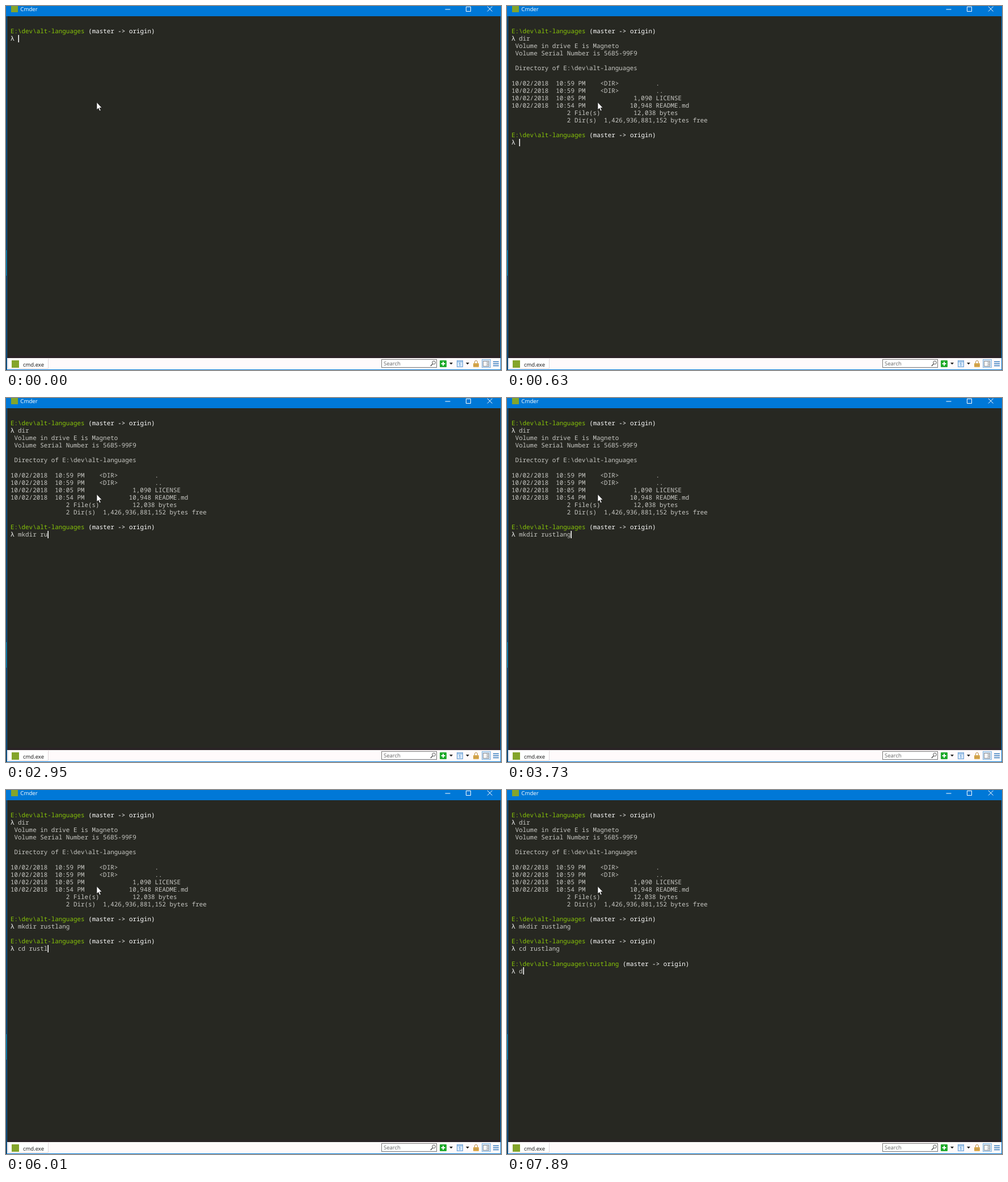
Recreate the animation shown at these times as an HTML page. Size 873 by 641 pixels, loop 8000 ms.

```html
<!DOCTYPE html>
<html lang="en">
<head>
<meta charset="utf-8">
<title>Terminal session</title>
<style>
  html, body { margin: 0; width: 100%; height: 100%; overflow: hidden; background: #272822; }
  svg { display: block; width: 873px; height: 641px; }
  text { text-rendering: geometricPrecision; white-space: pre; }
  #terminal { font: 10.885px "Noto Sans Mono", "DejaVu Sans Mono", monospace; }
  #terminal [fill="#fff"] { font-weight: 500; }
  .ui { font: 9.5px "Open Sans", "Noto Sans", sans-serif; }
  .line { fill: none; stroke-width: 1; }
</style>
</head>
<body>
<svg viewBox="0 0 873 641">
  <rect width="873" height="641" fill="#272822"/>
  <rect y="18" width="1" height="623" fill="#0b2c42"/>
  <rect y="430" width="1" height="45" fill="#087f92"/>
  <rect x="1" y="18" width="1" height="623" fill="#0a68b4"/>
  <rect x="872" y="18" width="1" height="623" fill="#0078d7"/>

  <!-- Title bar -->
  <rect width="873" height="18" fill="#0078d7"/>
  <rect x="9" width="12" height="11" fill="#84a52b"/>
  <text class="ui" x="25.3" y="9" fill="#fff" style="font-size:9.7px">Cmder</text>
  <path class="line" stroke="#fff" d="M774.5 6h9M811.5 1.5h8v8h-8zM849 1l8.5 8.5M857.5 1L849 9.5"/>

  <!-- Status bar -->
  <rect x="2" y="616" width="870" height="4" fill="#2a2326"/>
  <rect x="2" y="620" width="870" height="20" fill="#fffafb"/>
  <rect x="1" y="640" width="872" height="1" fill="#0078d7"/>
  <rect x="4" y="621" width="70" height="17" fill="#fff"/>
  <path class="line" stroke="#ddd8da" d="M3.5 621v17.5h71v-17.500"/>
  <rect x="10" y="624" width="13" height="13" fill="#84a52b"/>
  <text class="ui" x="30" y="634.5" fill="#111">cmd.exe</text>

  <rect x="662.5" y="622.5" width="97" height="14" fill="#fff" stroke="#777"/>
  <text class="ui" x="666" y="633" fill="#666" font-style="italic">Search</text>
  <g class="line" stroke="#555"><circle cx="754.5" cy="628" r="2.8"/><path stroke-width="1.6" d="M752.5 630.3l-3.7 3.7"/></g>

  <rect x="765" y="624" width="12" height="12" rx="1" fill="#1faa2b"/>
  <path stroke="#fff" stroke-width="2" d="M767.5 630h7M771 626.5v7"/>
  <path fill="#222" d="M782 628h6l-3 3.5zM811 628h6l-3 3.5z"/>

  <rect x="795.5" y="624.5" width="10" height="11" fill="#d5e6f8" stroke="#6a9fd4"/>
  <path class="line" stroke="#6a9fd4" d="M796 626.5h9M799 629.5l1.5-1v5.5"/>

  <path class="line" stroke="#b68c45" stroke-width="1.5" d="M826.5 630v-3q0-2.5 2.5-2.5t2.5 2.5v3"/>
  <rect x="824" y="629" width="10" height="7" rx="1" fill="#d9a94e"/>
  <path class="line" stroke="#b68c45" d="M824.5 632.5h9"/>

  <rect x="839.5" y="622.5" width="15" height="14" fill="#d3e6f7" stroke="#88b7df"/>
  <rect x="841.5" y="625.5" width="10" height="9" fill="#f4f4f4" stroke="#8a8f96"/>
  <path class="line" stroke="#9ca2aa" d="M848.5 626v8M849 628.5h2M849 631.5h2"/>

  <path stroke="#2f78bd" stroke-width="1.5" d="M859 626.5h10M859 630h10M859 633.5h10"/>

  <g id="terminal"></g>
  <rect id="caret" width="1.5" height="13" fill="#fff"/>
  <path fill="#fff" stroke="#111" stroke-width=".7" d="M160 169.5v13.3l3-2.7 2 4.7 2.2-.9-2-4.6h4z"/>
</svg>
<script>
const LOOP = 8000, LEFT = 8, TOP = 37.93, COL = 6.531, ROW = 13.07;
const GREEN = '#87c408', WHITE = '#fff', GRAY = '#c8c8c4';
const HOME = 'E:\\dev\\alt-languages';
const terminal = document.getElementById('terminal');
const caret = document.getElementById('caret');

const listing = ` Volume in drive E is Magneto
 Volume Serial Number is 56B5-99F9

 Directory of E:\\dev\\alt-languages

10/02/2018  10:59 PM    <DIR>          .
10/02/2018  10:59 PM    <DIR>          ..
10/02/2018  10:05 PM             1,090 LICENSE
10/02/2018  10:54 PM            10,948 README.md
               2 File(s)         12,038 bytes
               2 Dir(s)  1,426,936,881,152 bytes free`.split('\n');

// Evenly spaced key presses from first to last, in ms
const keys = (first, last, count) =>
  Array.from({ length: count }, (_, i) => first + (last - first) * i / (count - 1));

const prompts = [
  { start: 0, row: 0, path: HOME, command: 'dir', keys: [230, 400, 400] },
  { start: 630, row: 14, path: HOME, command: 'mkdir rustlang', output: listing, caretTime: 610,
    keys: [...keys(1720, 2020, 3), ...keys(2190, 2650, 4), ...keys(2800, 3730, 7)] },
  { start: 3960, row: 17, path: HOME, command: 'cd rustlang',
    keys: [...keys(4890, 5210, 3), ...keys(5380, 5690, 4), ...keys(6010, 6390, 4)] },
  { start: 7170, row: 20, path: HOME + '\\rustlang', command: 'd', keys: [7890] }
];

function svg(name, parent, attributes = {}) {
  const node = document.createElementNS('http://www.w3.org/2000/svg', name);
  for (const key in attributes) node.setAttribute(key, attributes[key]);
  return parent.appendChild(node);
}

function write(parent, row, col, string, fill) {
  const node = svg('text', parent, { x: LEFT + col * COL, y: TOP + row * ROW + 10.2, fill });
  node.textContent = string;
  return node;
}

for (const p of prompts) {
  p.group = svg('g', terminal);
  (p.output || []).forEach((line, i) => write(p.group, 2 + i, 0, line, GRAY));
  write(p.group, p.row, 0, p.path, GREEN);
  write(p.group, p.row, p.path.length + 1, '(master -> origin)', WHITE);
  write(p.group, p.row + 1, 0, 'λ', WHITE);
  p.typed = write(p.group, p.row + 1, 2, '', GRAY);
}

function draw(t) {
  let active;
  for (const p of prompts) {
    const shown = t >= p.start;
    p.group.setAttribute('visibility', shown ? 'visible' : 'hidden');
    p.count = p.keys.filter(time => time <= t).length;
    p.typed.textContent = p.command.slice(0, p.count);
    if (shown) active = p;
  }
  // The caret blinks off after a pause in typing
  const { count, row } = active;
  const idle = t - (count ? active.keys[count - 1] : active.start);
  const caretTime = count ? 550 : active.caretTime || 550;
  caret.setAttribute('x', Math.round(LEFT + (2 + count) * COL) + 0.5);
  caret.setAttribute('y', Math.round(TOP + (row + 1) * ROW));
  caret.setAttribute('visibility', idle < caretTime ? 'visible' : 'hidden');
}

const begin = performance.now();
function frame() {
  draw((performance.now() - begin) % LOOP);
  requestAnimationFrame(frame);
}
frame();
</script>
</body>
</html>
```
